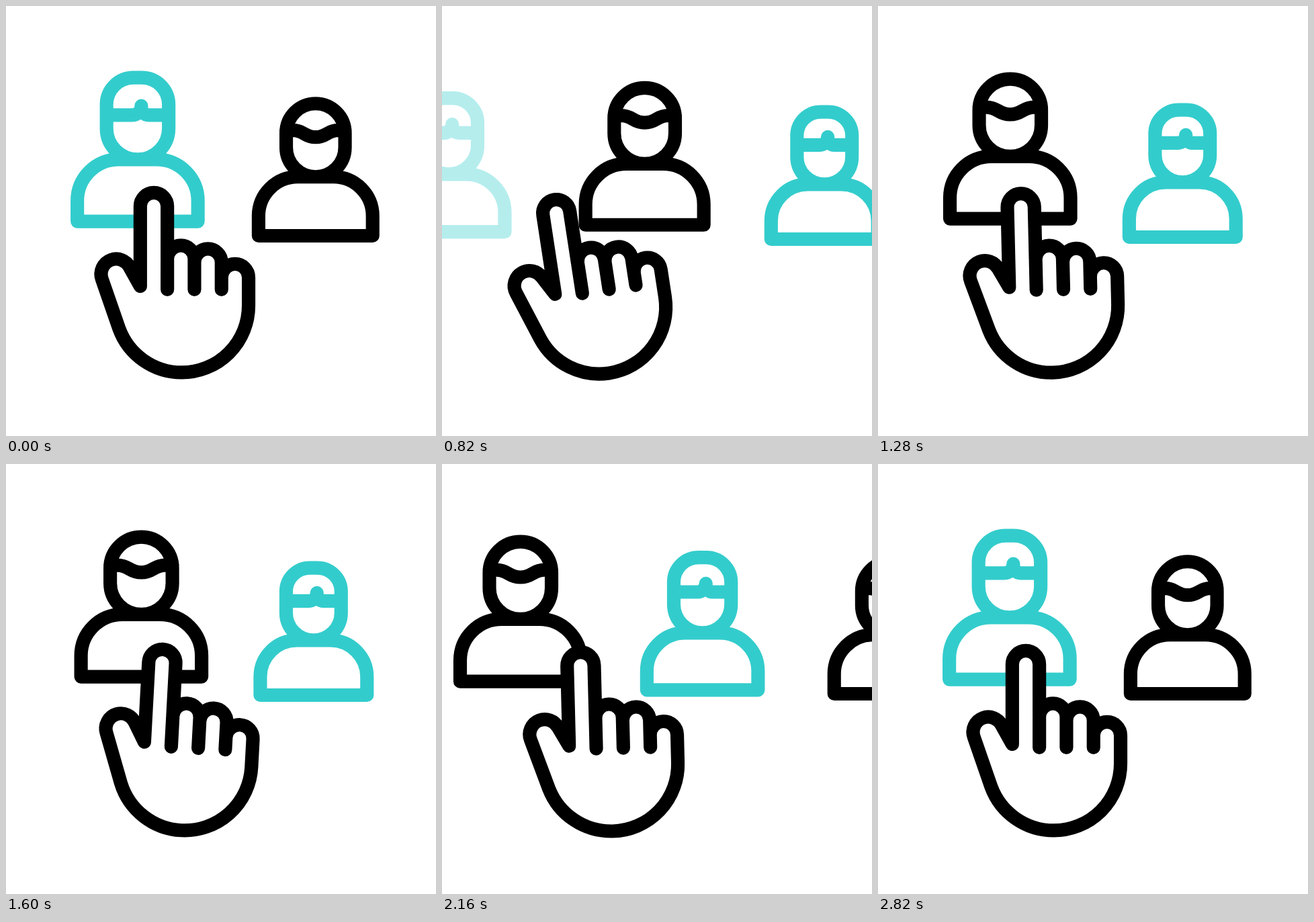
These frames come from a looping animation (640 px wide and 640 px high, 3.02 s). An HTML page with a canvas:

```html
<!DOCTYPE html>
<html lang="en">
<head>
<meta charset="utf-8">
<title>Choose a candidate</title>
<style>
  html, body { margin: 0; width: 100%; height: 100%; overflow: hidden; background: #fff; }
  canvas { display: block; }
</style>
</head>
<body>
<canvas id="stage" width="640" height="640"></canvas>
<script>
const ctx = document.getElementById('stage').getContext('2d');
const LOOP = 3020, STEP = 20, HALF = 1500;
const PULL_END = 375, SLIDE_END = 1125, HAND_END = 1312.5;
const R = 20.15;                 // finger radius, also the line width
const HEAD = 46.25, BODY = 89.75, SHOULDER = 61.5;
const PALM = { x: 220 + 7 * R - 99.4, y: 446, r: 99.4 };
const rad = deg => deg * Math.PI / 180;

// Head and torso around the figure's centre; the chin rests on the torso.
function bust(crown, half, chin) {
  const p = new Path2D();
  p.roundRect(-HEAD, -half, 2 * HEAD, half + chin, [crown, crown, HEAD, HEAD]);
  p.roundRect(-BODY, chin, 2 * BODY, half - chin, [SHOULDER, SHOULDER, 0, 0]);
  return p;
}

function makeMan() {
  const p = bust(HEAD, 104, 11.25), edge = -62, dip = -51.2;
  for (const side of [-1, 1]) {
    p.moveTo(side * HEAD, edge);
    p.lineTo(side * 36, edge);
    p.bezierCurveTo(side * 18, edge, side * 18, dip, 0, dip);
  }
  return p;
}

function makeWoman() {
  const p = bust(40, 107, 14.8), fringe = -51.25, part = 5.5;
  for (const [side, r] of [[-1, 13.5], [1, 11]]) {
    p.moveTo(side * HEAD, fringe);
    p.arcTo(part, fringe, part, fringe - r, r);
    p.lineTo(part, -65);
  }
  return p;
}

function makeHand() {
  const p = new Path2D(), tops = [298, 376.5, 381.5, 404];
  const fingerX = i => 220 + i * 2 * R;
  p.moveTo(fingerX(0) - R, 417);
  tops.forEach((y, i) => p.arc(fingerX(i), y, R, Math.PI, 0));
  p.arc(PALM.x, PALM.y, PALM.r, 0, rad(160));
  p.arc(164, 399, 22.5, rad(160), rad(333));
  p.closePath();
  for (let i = 1; i < tops.length; i++) {
    p.moveTo(fingerX(i) - R, tops[i - 1] + (i === 1 ? 80 : 0));
    p.lineTo(fingerX(i) - R, 422);
  }
  return p;
}

// Poses are [x, y, scale]: entering, waiting, chosen, leaving.
const woman = {
  path: makeWoman(), color: '#33cccc',
  enter: [774, 257.6, 0.885], wait: [453.3, 249.3, 0.885],
  chosen: [195.9, 213.6, 1], leave: [-110, 249.6, 0.89]
};
const man = {
  path: makeMan(), color: '#000',
  enter: [768, 243.6, 0.946], wait: [460.8, 243.6, 0.946],
  chosen: [196.8, 212.6, 1], leave: [-105, 234.4, 1]
};
const hand = makeHand();

// Hand poses are [degrees, dx, dy].
const rest = [0, 0, 0], lean = [6, 8.5, 0], swipe = [-17, -48.5, 3.5];

const blend = (a, b, p) => a.map((v, i) => v + (b[i] - v) * p);
const shift = ([x, y, k], dx) => [x + dx, y, k];

function ease(t, from, to) {
  const s = Math.min(1, Math.max(0, (t - from) / (to - from)));
  return s * s * (3 - 2 * s);
}

function drawFigure({ path, color }, [x, y, k], alpha = 1) {
  ctx.save();
  ctx.globalAlpha = alpha;
  ctx.translate(x, y);
  ctx.scale(k, k);
  ctx.lineWidth = R / k;
  ctx.strokeStyle = color;
  ctx.stroke(path);
  ctx.restore();
}

function drawFigures(t) {
  const second = t >= HALF, u = t % HALF;
  const [going, coming] = second && t < 2 * HALF ? [man, woman] : [woman, man];
  const pull = 26 * ease(u, 0, PULL_END);
  const p = ease(u, PULL_END, SLIDE_END);
  drawFigure(going, blend(shift(going.chosen, pull), going.leave, p), going === woman ? 1 - p : 1);
  drawFigure(going, blend(going.enter, going.wait, p));
  drawFigure(coming, blend(shift(coming.wait, pull), coming.chosen, p));
}

// The second lean starts as soon as the hand is back from the first swipe.
function handPose(t) {
  const second = t >= HAND_END, u = second ? t - HALF : t;
  const ready = blend(rest, lean, ease(u, second ? HAND_END - HALF : 0, PULL_END));
  const moved = blend(ready, swipe, ease(u, PULL_END, SLIDE_END));
  return blend(moved, rest, ease(u, SLIDE_END, HAND_END));
}

function drawHand(t) {
  const [deg, dx, dy] = handPose(t);
  ctx.save();
  ctx.translate(PALM.x + dx, PALM.y + dy);
  ctx.rotate(rad(deg));
  ctx.translate(-PALM.x, -PALM.y);
  ctx.lineWidth = R;
  ctx.fillStyle = '#fff';
  ctx.strokeStyle = '#000';
  ctx.fill(hand);
  ctx.stroke(hand);
  ctx.restore();
}

function draw(t) {
  ctx.fillStyle = '#fff';
  ctx.fillRect(0, 0, 640, 640);
  ctx.lineCap = ctx.lineJoin = 'round';
  drawFigures(Math.min(t, 2 * HALF - 1));
  drawHand(t);
}

const start = performance.now();
function tick() {
  const t = (performance.now() - start) % LOOP;
  draw(Math.floor(t / STEP) * STEP);
  requestAnimationFrame(tick);
}
tick();
</script>
</body>
</html>
```
